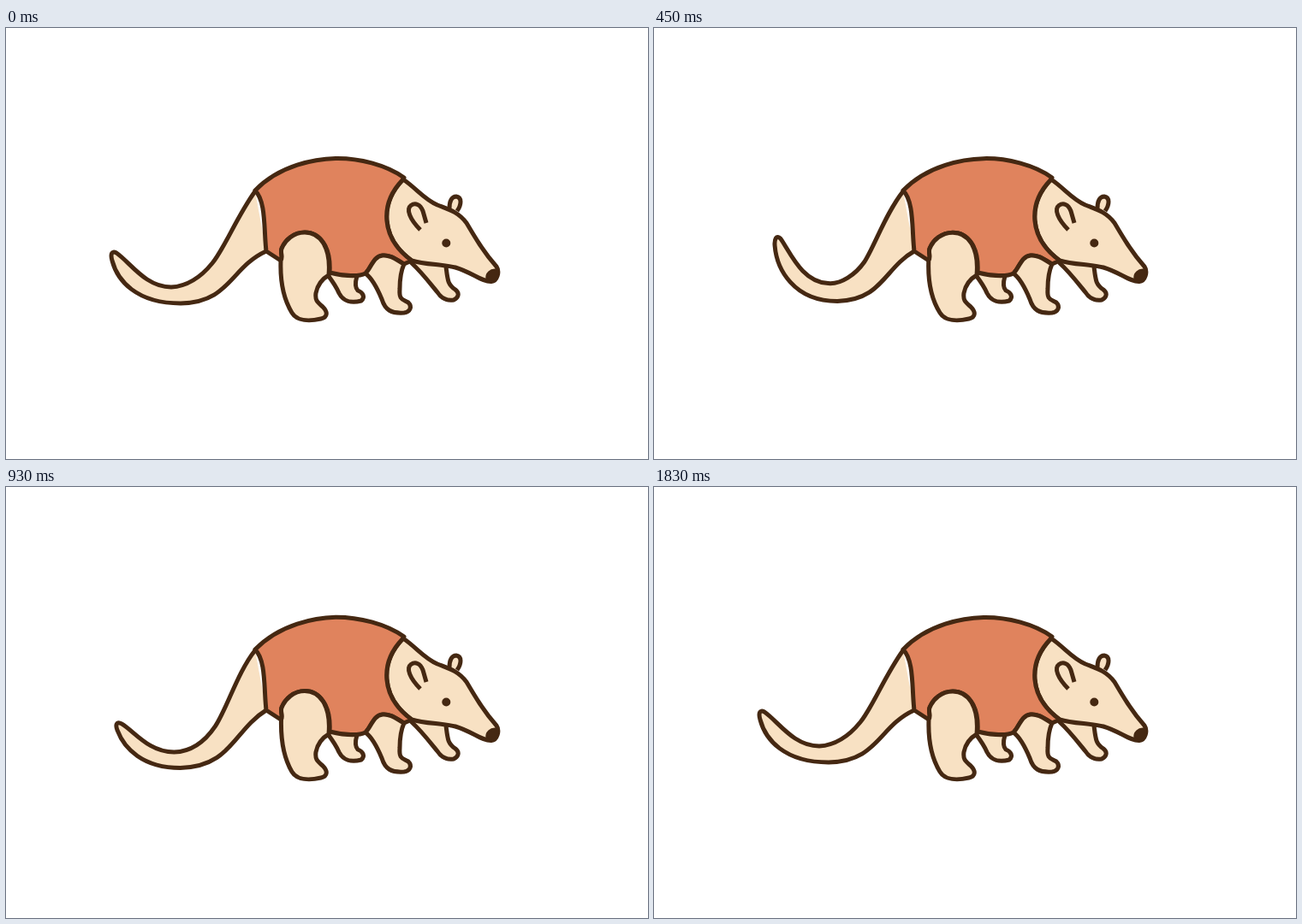
An HTML page for the animation above (2700 ms loop, 750x504 px).

```html
<!DOCTYPE html>
<html lang="en">
<head>
<meta charset="utf-8">
<title>Anteater</title>
<style>
  html, body { margin: 0; width: 100%; height: 100%; overflow: hidden; background: #fff; }
  svg { display: block; width: 100%; height: 100%; }
  path { stroke: #452812; stroke-width: 5; stroke-linejoin: round; stroke-linecap: round; }
  .cream { fill: #f8e1c3; }
  .shell { fill: #e0835d; }
  .dark { fill: #452812; }
  .ear { stroke-linecap: butt; }
</style>
</head>
<body>
<svg viewBox="0 0 750 504">
  <!-- far legs -->
  <path class="cream" d="M376 289C382 297 386 303 389 310C394 320 404 322 415 319C420 315 417 309 411 307C407 303 408 297 410 290"/>
  <path class="cream" d="M474 275C485 285 495 298 504 309C509 317 516 319 523 318C529 315 530 310 525 306C516 300 516 295 514 279"/>

  <path class="cream" id="tail"/>

  <path class="cream ear" id="farEar" d="M518 211C518 202 521 197 526 197C533 198 532 207 527 214"/>
  <path class="cream" d="M464 177C480 188 488 200 504 207C520 213 529 216 538 228C548 245 558 262 573 279C577 285 574 296 567 296.500C556 297 545 286 525 280C510 276 490 277 474 272C437 245 437 205 464 177Z"/>
  <path class="dark" style="stroke-width:2" d="M561.500 294C560 287 566 281 574 283C576 290 573 297 566 297Z"/>
  <ellipse class="dark" id="eye" cx="514.300" cy="251.500" rx="5" ry="5"/>
  <path class="cream ear" id="nearEar" d="M484 236C472 224 467 212 473 207.500C478 204 484 206 487 214L491 228"/>

  <path class="shell" id="shell"/>
  <path class="cream" id="hindLeg"/>
  <path class="cream" d="M465 276C456 271 449 265 440 266C429 267 427 280 420 287C428 293 434 305 439 317C443 330 450 334 465 333C472 332 475 326 470 321C463 317 459 318 460 305C460 295 461 285 465 276"/>
</svg>
<script>
const LOOP = 2700, STEP = 30;
const $ = id => document.getElementById(id);

// Bezier points of the tail between its two fixed roots
const rest = [270,220, 255,258, 241,275, 228,291, 212,302, 193,303, 163,303, 145,274, 129,263,
              123,260, 122,265, 124,272, 130,295, 152,322, 204,322, 262,321, 262,280];
const raised = [270,220, 256,250, 244,267, 231,283, 212,294, 197,292, 163,290, 150,254, 139,238,
                134,233, 131,238, 132,246, 134,272, 155,314, 210,314, 262,313, 266,278];
const curled = [272,212, 262,258, 248,283, 240,298, 226,310, 210,310, 184,310, 168,278, 156,265,
                151,261, 149,266, 150,274, 154,300, 172,329, 217,329, 272,327, 272,285];
const lowered = [272,212, 262,258, 248,284, 236,305, 222,316, 201,316, 172,316, 156,294, 143,287,
                 137,283, 135,288, 138,294, 147,314, 168,334, 205,334, 266,332, 270,288];

const swingTimes = [120, 330, 600, 810, 1080];
const swing = [rest, raised, curled, lowered, rest];
const sway = [0, -1, 1, 1, 0];

// Smooth curve through values, at rest at both ends
function spline(times, values, t) {
  const last = times.length - 1;
  if (t <= times[0]) return values[0];
  if (t >= times[last]) return values[last];
  let i = 0;
  while (t >= times[i + 1]) i++;
  const slope = k => k === 0 || k === last ? 0
    : (values[k + 1] - values[k - 1]) / (times[k + 1] - times[k - 1]);
  const h = times[i + 1] - times[i], u = (t - times[i]) / h, v = 1 - u;
  return v * v * (1 + 2 * u) * values[i] + u * u * (3 - 2 * u) * values[i + 1]
    + h * u * v * (v * slope(i) - u * slope(i + 1));
}

function blink(t, start, low, end) {
  if (t <= start || t >= end) return 1;
  const closed = t < low ? (t - start) / (low - start) : (end - t) / (end - low);
  return 1 - 0.7 * closed;
}

function draw(t) {
  const points = rest.map((_, i) => spline(swingTimes, swing.map(p => p[i]), t).toFixed(2));
  $('tail').setAttribute('d', `M291 191C${points.join(' ')} 304 261`);

  const w = spline(swingTimes, sway, t);
  const hip = 239 - w;
  $('shell').setAttribute('d',
    `M291 190C320 160 362 ${153 - w * 0.7} 385 ${152.500 - w * 0.7}C412 152 444 160 465 175
     L463 178C437 205 437 245 474 272L465 276C456 271 449 265 440 266C429 267 427 280 420 287
     C412 291 395 290 378 286C380 255 366 ${hip} 349 ${hip}C336 ${hip} 326 248 322 258
     C320 263 324 267 321 272L304 261C301 235 304 203 291 190Z`);
  $('hindLeg').setAttribute('d',
    `M377 289C380 255 366 ${hip} 349 ${hip}C336 ${hip} 326 248 322 258C320 263 324 267 ${321 + w} 272
     C${320 + w * 1.5} 300 ${326 + w} 320 334 333C340 343 355 343 368 340C376 338 376 332 370 326
     C363 320 361 318 362 310C364 300 370 293 377 289`);

  const twitch = spline([1380, 1590, 1830], [0, 1, 0], t);
  $('nearEar').setAttribute('transform', `rotate(${-17 * twitch} 488 232)`);
  $('farEar').setAttribute('transform', `rotate(${-7 * twitch} 523 213)`);
  $('eye').setAttribute('ry', 5 * Math.min(blink(t, 510, 585, 660), blink(t, 1650, 1725, 1800)));
}

const start = performance.now();
function tick() {
  const t = (performance.now() - start) % LOOP;
  draw(Math.floor(t / STEP) * STEP);
  requestAnimationFrame(tick);
}
tick();
</script>
</body>
</html>
```
